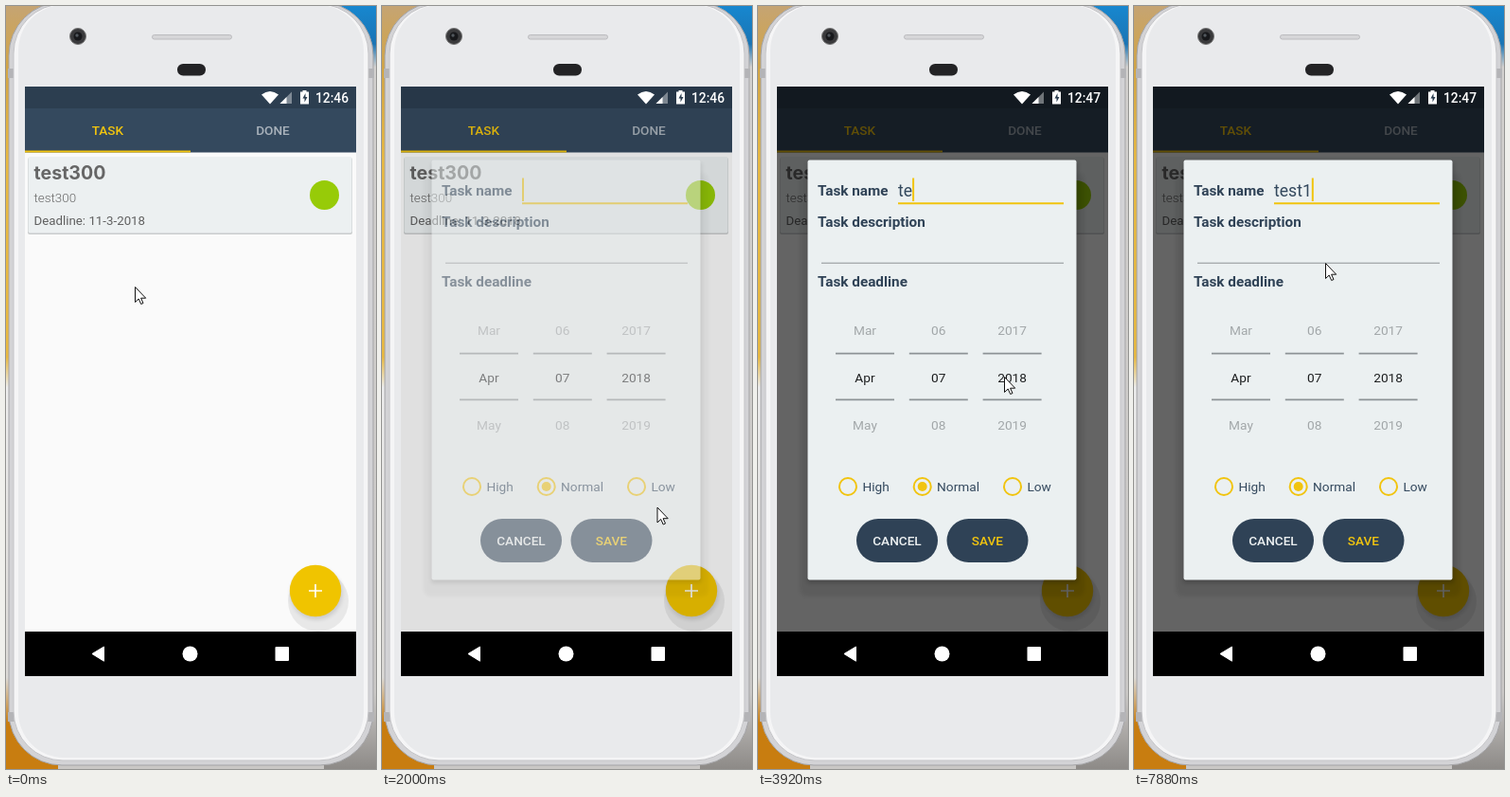
An HTML page for the animation above (8 s loop, 391 px wide and 805 px high).

```html
<!DOCTYPE html>
<html lang="en">
<head>
<meta charset="utf-8">
<title>Task app</title>
<style>
  html, body { margin: 0; width: 100%; height: 100%; overflow: hidden; }
  svg { display: block; width: 391px; height: 805px; font-family: Roboto, sans-serif; }
  .mid { text-anchor: middle; }
  .caps { font-size: 13.6px; font-weight: 500; text-anchor: middle; }
  .label { font-size: 15.3px; font-weight: 700; fill: #2f4256; }
</style>
</head>
<body>
<svg viewBox="0 0 391 805">
  <defs>
    <linearGradient id="leftWall" x2="0" y2="1">
      <stop offset="0" stop-color="#c5a473"/><stop offset=".08" stop-color="#d3a544"/>
      <stop offset=".2" stop-color="#e9b93f"/><stop offset=".46" stop-color="#e9b93f"/>
      <stop offset=".5" stop-color="#eeeeee"/><stop offset=".88" stop-color="#dcdad7"/>
      <stop offset=".94" stop-color="#c87d10"/>
    </linearGradient>
    <linearGradient id="rightWall" x2="0" y2="1">
      <stop offset="0" stop-color="#1787cf"/><stop offset=".05" stop-color="#1b75b4"/>
      <stop offset=".08" stop-color="#d3d1cf"/><stop offset=".9" stop-color="#cbc9c7"/>
      <stop offset="1" stop-color="#8d8a87"/>
    </linearGradient>
    <filter id="blur" x="-30%" y="-30%" width="160%" height="160%"><feGaussianBlur stdDeviation="2"/></filter>
    <clipPath id="content"><rect x="20" y="154" width="350" height="506"/></clipPath>
  </defs>

  <!-- backdrop and phone body -->
  <rect width="391" height="805" fill="#c9c7c5"/>
  <rect width="55" height="805" fill="url(#leftWall)"/>
  <rect x="336" width="55" height="805" fill="url(#rightWall)"/>
  <rect x="3" y="-4" width="385" height="805" rx="56" fill="#d3d3d6" stroke="#a3a3a6"/>
  <path d="M2 66h8v10h-8zM381 66h8v10h-8zM2 745h8v10h-8zM381 745h8v10h-8z" fill="#b4b4b7"/>
  <rect x="8" y="-2" width="375" height="798" rx="52" fill="#f5f5f6" stroke="#c4c4c7"/>
  <rect x="13" y="-1" width="365" height="794" rx="48" fill="#e9eaec"/>
  <circle cx="76" cy="32" r="8.5" fill="#3a3a3c" stroke="#777"/>
  <circle cx="76" cy="32" r="4.5" fill="#17181b"/><circle cx="75" cy="31" r="1.7" fill="#51575d"/>
  <rect x="154.5" y="30.500" width="84" height="4.500" rx="2.200" fill="#d6d6d8" stroke="#bbbbbe"/>
  <rect x="181" y="61" width="30" height="12.5" rx="6.2" fill="#232325"/>

  <!-- task list -->
  <rect x="20" y="85" width="350" height="575" fill="#fafafa"/>
  <rect x="20" y="85" width="350" height="23" fill="#2c3e50"/>
  <rect x="20" y="108" width="350" height="46.500" fill="#34495e"/>
  <rect x="20" y="152.500" width="175" height="2" fill="#f1c40f"/>
  <text class="caps" x="107.500" y="136.200" fill="#f1c40f">TASK</text>
  <text class="caps" x="282" y="136.200" fill="#a9b2bb">DONE</text>
  <rect x="23" y="160" width="343" height="81" rx="2" fill="#c9cccd"/>
  <rect x="23.500" y="159" width="342" height="80.500" rx="2" fill="#ecf0f1"/>
  <text x="29.500" y="183" font-family="Inter, sans-serif" font-size="19.600" font-weight="700" fill="#666">test300</text>
  <text x="29.500" y="207.300" font-size="13.400" font-weight="300" fill="#666">test300</text>
  <text x="29.500" y="230.700" font-size="13.300" fill="#606060">Deadline: 11-3-2018</text>
  <circle cx="336.500" cy="199.500" r="15.500" fill="#97cb08"/>
  <g clip-path="url(#content)">
    <circle id="fabShadow" cx="330" cy="628" fill="#000" opacity=".07"/>
    <circle cx="328" cy="620" r="27.500" opacity=".12" filter="url(#blur)"/>
    <circle id="fab" cx="327" cy="617" r="27.200"/>
    <path d="M320 617h14M327 610v14" stroke="#fff" stroke-width="1.700"/>
  </g>

  <rect id="scrim" x="20" y="85" width="350" height="575"/>

  <!-- system bars -->
  <g fill="#fff">
    <path d="M270 93.500q9-7 18 0L279 103.500z"/>
    <path d="M302 90.500V103H289.500z" opacity=".4"/><path d="M296.500 96V103H289.500z"/>
    <path d="M313.500 89h4v1.500h2.500V103.500h-9V90.500h2.500z"/>
    <path d="M316.500 92l-3 5.500h2v4l3-5.500h-2z" fill="#2c3e50"/>
    <text id="clock" x="362" y="102" font-size="13.800" font-weight="500" text-anchor="end"></text>
    <rect x="20" y="660" width="350" height="47" fill="#000"/>
    <path d="M91 683.500L103.500 676v15.200z" stroke="#fff" stroke-linejoin="round"/>
    <circle cx="194.500" cy="683.500" r="8"/><rect x="284.500" y="676" width="14.500" height="15" rx="1"/>
  </g>

  <g id="dialog">
    <rect x="44" y="176" width="301" height="447" rx="8" opacity=".07" filter="url(#blur)"/>
    <rect x="52" y="165" width="286" height="444" rx="3" opacity=".18" filter="url(#blur)"/>
    <rect x="52.500" y="162.500" width="284" height="443" rx="2" fill="#ebf0f1"/>
    <text class="label" x="63" y="200.200">Task name</text>
    <text class="label" x="63" y="232.600">Task description</text>
    <text class="label" x="63" y="295.700">Task deadline</text>
    <path d="M148 208.200h175" stroke="#f1c40f" stroke-width="2"/>
    <path d="M67 271.200h256" stroke="#8b9194"/>
    <text id="entry" x="148" y="201" font-size="17.600" fill="#34495e"></text>
    <rect id="caret" y="181.500" width="2" height="24.500" fill="#f1c40f"/>
    <g id="pickers" class="mid" font-size="13.700"></g>
    <g id="radios" font-size="13.700" fill="#34495e"></g>
    <rect x="104" y="541" width="86" height="46" rx="23" fill="#2f4256"/>
    <rect x="199.500" y="541" width="86" height="46" rx="23" fill="#2f4256"/>
    <text class="caps" x="147" y="569" fill="#ecf0f1">CANCEL</text>
    <text class="caps" x="242.300" y="569" fill="#f1c40f">SAVE</text>
  </g>

  <path id="cursor" d="M.5.500V16.500L4.200 13 6.700 18.500 9 17.500 6.600 12.200H11.700z" fill="#fff" stroke="#111"/>
</svg>
<script>
const LOOP = 8000, TICK = LOOP / 60; // the screen refreshes once per tick
const BLINK = 460, KEY_GAP = 290, FIRST_KEY = 3610, LAST_KEY = 6030, FOCUS = 2480;
const el = id => document.getElementById(id);
const set = (id, attrs) => {
  for (const name in attrs) el(id).setAttribute(name, attrs[name]);
};
const clamp = (v, lo, hi) => Math.min(hi, Math.max(lo, v));

const columns = [["Mar", "Apr", "May"], ["06", "07", "08"], ["2017", "2018", "2019"]];
el("pickers").innerHTML = columns.map((rows, col) => {
  const x = 113 + 77.8 * col;
  const texts = rows.map((row, i) =>
    `<text x="${x}" y="${346.5 + 50 * i}" fill="${i === 1 ? "#1d1f20" : "#a2a7a9"}">${row}</text>`);
  const rules = [366.7, 415.3].map(y =>
    `<path d="M${x - 31} ${y}h62" stroke="#8d9396" stroke-width="1.8"/>`);
  return texts.concat(rules).join("");
}).join("");

el("radios").innerHTML = [[95, "High"], [173.7, "Normal"], [269, "Low"]].map(([x, name]) =>
  `<circle cx="${x}" cy="507" r="9" fill="none" stroke="#f1c40f" stroke-width="2"/>` +
  (name === "Normal" ? `<circle cx="${x}" cy="507" r="5" fill="#f1c40f"/>` : "") +
  `<text x="${x + 15.4}" y="512">${name}</text>`).join("");

// Turning points of the pointer: [tick, x, y], straight moves between them.
const turns = [
  [0, 136, 296], [2, 132, 444], [3, 164, 545], [5, 85, 675], [7, 134, 562], [8, 284, 576],
  [10, 316, 619], [11, 310, 592], [14, 310, 592], [16, 271, 465], [19, 260, 391],
  [44, 260, 391], [46, 379, 300], [47, 96, 250], [49, 321, 350], [52, 309, 451],
  [55, 220, 349], [59, 202, 271]
];

function pointerAt(tick) {
  const next = Math.max(1, turns.findIndex(turn => turn[0] >= tick));
  const [t0, x0, y0] = turns[next - 1], [t1, x1, y1] = turns[next];
  const k = (tick - t0) / (t1 - t0);
  return [x0 + (x1 - x0) * k, y0 + (y1 - y0) * k];
}

// Number of letters typed, and when the caret last restarted its blinking.
function typingAt(t) {
  if (t >= LAST_KEY) return [5, LAST_KEY];
  if (t < FIRST_KEY) return [0, FOCUS];
  const key = Math.min(3, Math.floor((t - FIRST_KEY) / KEY_GAP));
  return [key + 1, FIRST_KEY + key * KEY_GAP];
}

function draw(t) {
  const tick = Math.floor(t / TICK + 0.01);
  const [x, y] = pointerAt(tick);
  set("cursor", { transform: `translate(${x} ${y})` });

  const pressed = tick === 13 || tick === 14;
  set("fab", { fill: pressed ? "#dfb500" : "#f0c400" });
  set("fabShadow", { r: pressed ? 35 : 32, filter: pressed ? "url(#blur)" : "none" });

  const shown = clamp((tick - 14) / 2, 0, 1);
  set("dialog", { opacity: shown });
  set("scrim", { opacity: 0.6 * shown ** 2.5 });
  el("clock").textContent = t < 3490 ? "12:46" : "12:47";

  const [letters, restart] = typingAt(t);
  const lit = t < restart || Math.floor((t - restart) / BLINK) % 2 === 0;
  el("entry").textContent = "test1".slice(0, letters);
  set("caret", { x: 148 + el("entry").getComputedTextLength(), opacity: +lit });
}

function frame() {
  draw(performance.now() % LOOP);
  requestAnimationFrame(frame);
}
frame();
</script>
</body>
</html>
```
